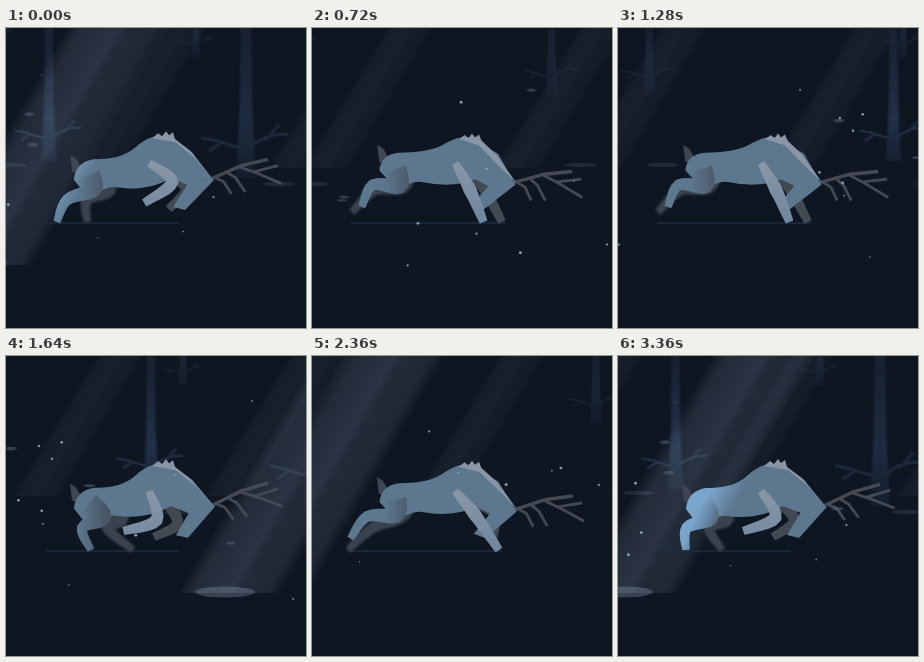
Write an HTML page that moves like this. It is 300 px wide and 300 px high and loops after 3400 ms.

```html
<!DOCTYPE html>
<html lang="en">
<head>
<meta charset="utf-8">
<title>Running stag</title>
<style>
  html, body { margin: 0; width: 100%; height: 100%; overflow: hidden; background: #0e1621; }
  svg { display: block; width: 100vw; height: 100vh; }
</style>
</head>
<body>
<svg viewBox="0 0 300 300">
  <defs>
    <linearGradient id="bark" gradientUnits="userSpaceOnUse" x1="0" y1="-150" x2="0" y2="0">
      <stop offset="0" stop-color="#202d42" stop-opacity=".6"/>
      <stop offset=".7" stop-color="#293a54"/>
      <stop offset="1" stop-color="#22324a" stop-opacity=".5"/>
    </linearGradient>
    <linearGradient id="ray">
      <stop offset="0" stop-color="#a3b4d0" stop-opacity="0"/>
      <stop offset=".14" stop-color="#a3b4d0" stop-opacity=".13"/>
      <stop offset=".5" stop-color="#a3b4d0" stop-opacity=".19"/>
      <stop offset=".6" stop-color="#a3b4d0" stop-opacity=".13"/>
      <stop offset=".86" stop-color="#a3b4d0" stop-opacity=".11"/>
      <stop offset="1" stop-color="#a3b4d0" stop-opacity="0"/>
    </linearGradient>
    <linearGradient id="glow">
      <stop offset="0" stop-color="#86b8e6" stop-opacity=".7"/>
      <stop offset=".7" stop-color="#86b8e6" stop-opacity=".7"/>
      <stop offset="1" stop-color="#86b8e6" stop-opacity="0"/>
    </linearGradient>
    <linearGradient id="shin" gradientUnits="userSpaceOnUse" x1="0" y1="138" x2="0" y2="192">
      <stop offset="0" stop-color="#8995a5"/>
      <stop offset="1" stop-color="#7088a0"/>
    </linearGradient>
    <linearGradient id="thigh" gradientUnits="userSpaceOnUse" x1="72" y1="0" x2="102" y2="0">
      <stop offset="0" stop-color="#5d788e"/>
      <stop offset="1" stop-color="#485464"/>
    </linearGradient>
    <filter id="soft" x="-20%" y="-20%" width="140%" height="140%"><feGaussianBlur stdDeviation=".9 .3"/></filter>
    <filter id="smear" x="-20%" y="-20%" width="140%" height="140%"><feGaussianBlur stdDeviation="1"/></filter>
    <g id="tree">
      <path d="M-3-300H3L5-60 8 0H-8L-5-60Z" fill="url(#bark)"/>
      <path d="M-4-24Q-16-27-24-30L-35-32M-20-28L-29-22M4-25Q16-36 33-35M16-31L26-42" fill="none" stroke="#25344b" stroke-width="2.6" stroke-linecap="round"/>
    </g>
    <clipPath id="coat"><use href="#body"/><use href="#hindNear"/></clipPath>
  </defs>
  <rect width="300" height="300" fill="#0e1621"/>
  <g id="scenery"></g>
  <path id="ground" stroke="#1b2c42" stroke-width="1.6"/>
  <path id="tail" d="M64 128L70 132 74 139 77 149 66 145 65 137Z" fill="#3f4651"/>
  <path id="hindFar" fill="#3b424d" filter="url(#smear)"/>
  <path id="foreFar" fill="#434953"/>
  <g id="head">
    <g fill="none" stroke="#454954">
      <path d="M204 151L235 137 262 130" stroke-width="3.4"/>
      <path d="M234 138L254 145 276 154M247 143L272 136M209 149L218 153 226 165M222 144L230 149 240 163" stroke-width="2.8"/>
    </g>
    <path d="M170 118L186 124 208 152 180 182 168 179 183 155 168 148Z" fill="#5d788e"/>
  </g>
  <path id="body" fill="#5d788e"/>
  <path id="hindNear" fill="url(#thigh)"/>
  <g id="lit" clip-path="url(#coat)"></g>
  <path id="ruff" fill="#8a96a5"/>
  <path id="foreNear" fill="url(#shin)"/>
  <g id="air"></g>
</svg>
<script>
const LOOP = 3400, STEP = 40, FRAMES = 84, STRIDE = 14, GROUND = 195;
const $ = id => document.getElementById(id);
const lerp = (a, b, t) => a + (b - a) * t;
const mod = (a, n) => (a % n + n) % n;
const set = (el, name, value) => el.setAttribute(name, value);

let seed = 11;
function random(min, max) {
  seed = seed * 16807 % 2147483647;
  return lerp(min, max, seed / 2147483647);
}

function add(parent, tag, attrs) {
  const el = document.createElementNS('http://www.w3.org/2000/svg', tag);
  for (const k in attrs) set(el, k, attrs[k]);
  return parent.appendChild(el);
}

// Scrolling items start at x and wrap once per loop.
const movers = [];
const scroll = (el, x, speed, y = 0, extra = '') => movers.push({ el, x, speed, y, extra });
const scenery = $('scenery'), air = $('air');

const FAINT_SPEED = 16, FAINT_COUNT = 7;
for (let i = 0; i < FAINT_COUNT; i++) {
  const ray = add(scenery, 'rect', { x: -24, width: 48, height: 140, fill: 'url(#ray)', opacity: .35 });
  scroll(ray, 178 + i * FAINT_SPEED * FRAMES / FAINT_COUNT, FAINT_SPEED, 0, 'skewX(-31)');
}

const forest = [
  { y: 30, size: .55, speed: 12, opacity: .4, starts: [190, 657] },
  { y: 67, size: .75, speed: 14.9, opacity: .4, starts: [493, 1148] },
  { y: 133, size: .95, speed: 14.5, opacity: .75, starts: [43, 725] },
  { y: 150, size: 1.25, speed: 22, opacity: .6, starts: [240, 1188] }
];
for (const { y, size, speed, opacity, starts } of forest)
  for (const x of starts)
    scroll(add(scenery, 'use', { href: '#tree', opacity, filter: 'url(#soft)' }), x, speed, y, `scale(${size})`);

for (let i = 0; i < 5; i++) {
  const patch = add(scenery, 'ellipse', { rx: 16, ry: 2.2, fill: '#8aa0b8', opacity: .14, filter: 'url(#soft)' });
  scroll(patch, 5 + i * 268, 16, 137 + i % 2 * 19);
}

const BEAM_SPEED = 34;
for (const x of [112, 1720, 2054]) {
  const beam = { x: -52, width: 104, height: 237 };
  scroll(add(scenery, 'rect', { ...beam, fill: 'url(#ray)' }), x, BEAM_SPEED, 0, 'skewX(-30)');
  scroll(add(scenery, 'ellipse', { rx: 30, ry: 5.5, fill: '#a3b6cc', opacity: .28, filter: 'url(#soft)' }), x - 141, BEAM_SPEED, 236);
  scroll(add($('lit'), 'rect', { ...beam, fill: 'url(#glow)' }), x + 4, BEAM_SPEED, 0, 'skewX(-30)');
}

for (let i = 0; i < 9; i++) {
  const chip = add(air, 'rect', { x: -5, y: -1.5, width: random(8, 11), height: random(2, 4), rx: 1.5, fill: '#5b6b7a', opacity: .5, filter: 'url(#soft)' });
  scroll(chip, random(0, 2016), 24, random(55, 215));
}
for (let i = 0; i < 40; i++) {
  const mote = add(air, 'circle', { r: random(.6, 1.5), fill: '#a9cbdc', opacity: .75 });
  scroll(mote, random(0, 1764), 21, random(40, 245));
}

// Each foot sweeps back along the ground, then swings forward above it.
const smooth = u => u * u * (3 - 2 * u);
const legs = {
  hindNear: { front: 136, back: 34, lands: 9, stance: 6, lift: 15, ease: smooth, root: [83, 148], widths: [24, 16, 11, 7] },
  hindFar: { front: 150, back: 36, lands: 11, stance: 5, lift: 14, ease: smooth, root: [94, 148], widths: [22, 16, 11, 7] },
  foreNear: { front: 187, back: 110, lands: 2, stance: 5, lift: 19, ease: u => u ** 4, root: [143, 135], bones: [30, 35], widths: [7, 13, 8] },
  foreFar: { front: 190, back: 130, lands: 3, stance: 5, lift: 13, ease: u => u ** 1.5, root: [161, 145], bones: [25, 27], widths: [12, 11, 8] }
};

function footAt({ front, back, lands, stance, lift, ease }, p) {
  const since = mod(p - lands, STRIDE);
  if (since < stance) return [lerp(front, back, since / stance), GROUND - 1];
  const u = (since - stance) / (STRIDE - stance);
  return [lerp(back, front, ease(u)), GROUND - 1 - lift * Math.min(1, 2 * Math.sin(Math.PI * u))];
}

// Front knee: two bones bending forward
function foreJoints([x, y], [fx, fy], [upper, lower]) {
  const d = Math.min(Math.hypot(fx - x, fy - y), upper + lower - .1);
  const bend = Math.acos((upper * upper + d * d - lower * lower) / (2 * upper * d));
  const angle = Math.atan2(fy - y, fx - x) - bend;
  return [[x, y], [x + upper * Math.cos(angle), y + upper * Math.sin(angle)], [fx, fy]];
}

// Hind knee and hock trail the foot
function hindJoints([x, y], [fx, fy], flat) {
  const shift = x - 83;
  return [[x, y - 10 * flat], [72 + .3 * fx + shift / 2, 162 - 6 * flat], [lerp(69 + shift, fx, .45), fy - 22], [fx, fy]];
}

// Tapered limb around a smooth curve through its joints
function limb(joints, widths) {
  const n = joints.length - 1, steps = 6, line = [];
  const joint = i => joints[Math.min(n, Math.max(0, i))];
  for (let s = 0; s <= n * steps; s++) {
    const i = Math.min(n - 1, Math.floor(s / steps)), t = s / steps - i;
    const [a, b, c, d] = [joint(i - 1), joint(i), joint(i + 1), joint(i + 2)];
    const at = k => b[k] + t / 2 * (c[k] - a[k] + t * (2 * a[k] - 5 * b[k] + 4 * c[k] - d[k] + t * (3 * (b[k] - c[k]) + d[k] - a[k])));
    line.push([at(0), at(1), lerp(widths[i], widths[i + 1], t) / 2]);
  }
  const left = [], right = [];
  line.forEach(([x, y, w], i) => {
    const a = line[Math.max(0, i - 1)], b = line[Math.min(line.length - 1, i + 1)];
    const dx = b[0] - a[0], dy = b[1] - a[1], len = Math.hypot(dx, dy) || 1;
    const nx = -dy / len * w, ny = dx / len * w;
    left.push([x + nx, y + ny]);
    right.unshift([x - nx, y - ny]);
  });
  return 'M' + [...left, ...right].map(q => q[0].toFixed(1) + ' ' + q[1].toFixed(1)).join('L') + 'Z';
}

// Blend two paths of the same structure
function blend(a, b, t) {
  const nums = b.match(/[\d.]+/g);
  let i = 0;
  return a.replace(/[\d.]+/g, v => lerp(+v, +nums[i++], t).toFixed(2));
}
const bodyArched = 'M68 153C69 141 76 134 88 132C105 132 118 130 130 119C138 112 146 108 153 108L169 111L188 126L196 148L183 157L165 150C150 159 130 163 110 160C98 158 95 168 78 166Z';
const bodyFlat = 'M67 137C68 127 74 122 86 121C105 120 118 120 131 116C140 112 146 110 153 109L169 112L184 130L192 154L178 161L162 152C150 156 130 156 110 151C98 149 98 158 80 150Z';
const ruffArched = 'M146 110L152 105L156 108L160 103L163 107L167 104L169 111L184 122L208 152L190 130L170 114Z';
const ruffFlat = 'M148 112L153 108L157 111L160 107L163 111L167 108L170 114L184 129L203 157L188 145L165 119Z';

function draw(ms) {
  const frame = Math.max(0, Math.floor(mod(ms, LOOP) / STEP) - 1);
  const p = frame % STRIDE;
  const wave = peak => Math.cos(2 * Math.PI * (p - peak) / STRIDE);
  const flat = .5 - .5 * wave(12.8);

  for (const m of movers) {
    const span = m.speed * FRAMES;
    const x = mod(m.x - m.speed * frame + 250, span) - 250;
    set(m.el, 'transform', `translate(${x} ${m.y}) ${m.extra}`);
    set(m.el, 'visibility', x < 520 ? 'visible' : 'hidden');
  }

  const feet = {};
  for (const id in legs) {
    const { root, bones, widths } = legs[id];
    const foot = feet[id] = footAt(legs[id], p);
    const joints = bones ? foreJoints(root, foot, bones) : hindJoints(root, foot, flat);
    set($(id), 'd', limb(joints, widths));
  }

  const from = Math.min(41, feet.hindNear[0], feet.hindFar[0]) - 1;
  const to = Math.max(170, feet.foreNear[0], feet.foreFar[0]) + 3;
  set($('ground'), 'd', `M${from} ${GROUND}H${to}`);
  set($('tail'), 'transform', `translate(${2 * flat} ${-17 * flat})`);
  set($('head'), 'transform', `rotate(${4.5 - 6.5 * wave(11.8)} 175 125)`);
  set($('body'), 'd', blend(bodyArched, bodyFlat, flat));
  set($('ruff'), 'd', blend(ruffArched, ruffFlat, flat));
}

const start = performance.now();
function tick() {
  draw(performance.now() - start);
  requestAnimationFrame(tick);
}
draw(0);
requestAnimationFrame(tick);
</script>
</body>
</html>
```
